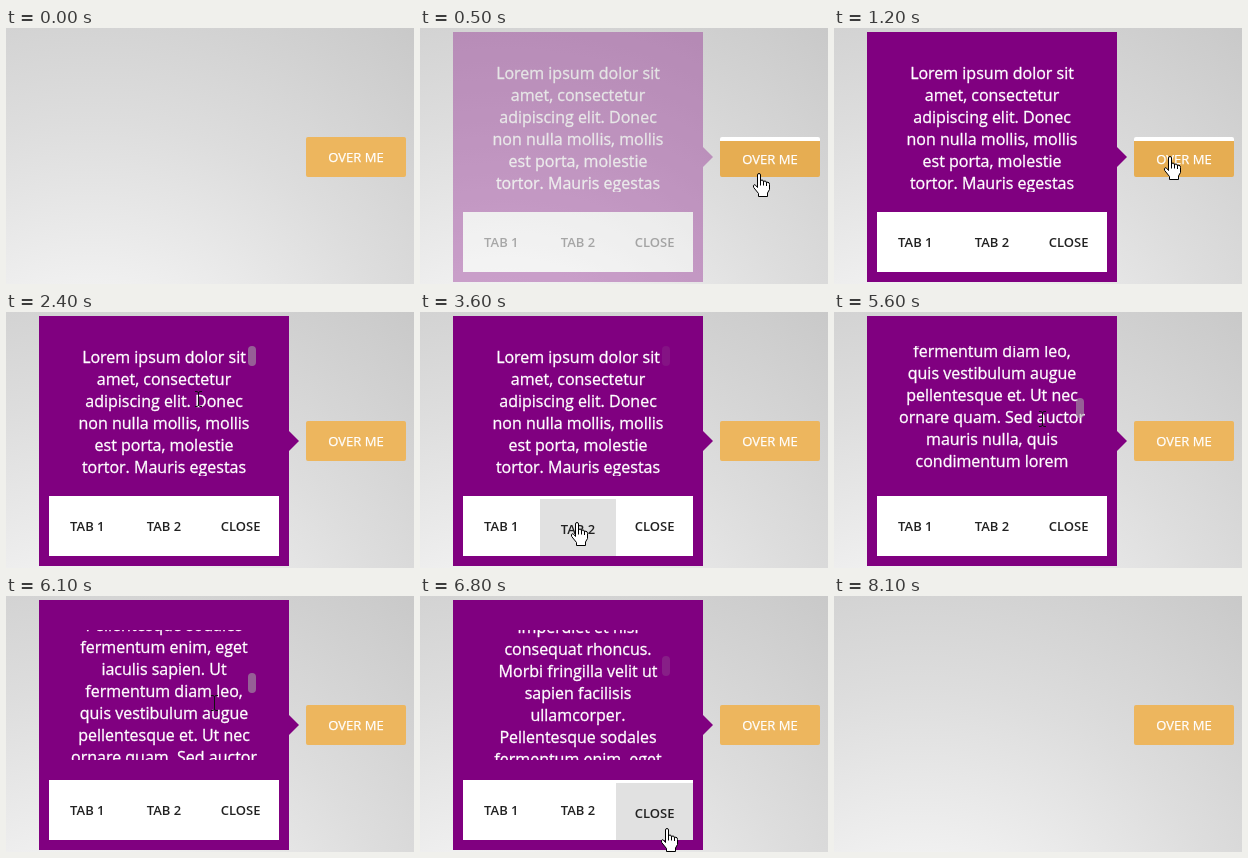
These frames come from a looping animation (408x256 px, 8700 ms). An HTML page:

```html
<!DOCTYPE html>
<html lang="en">
<head>
<meta charset="utf-8">
<title>Hover popup</title>
<style>
  html, body { margin: 0; width: 100%; height: 100%; overflow: hidden; }
  body {
    position: relative;
    font: 13px "Open Sans", sans-serif;
    background: radial-gradient(circle at 85px 421px, #f0f0f0 165px, #ddd 329px, #c8c8c8 540px);
  }
  div, svg { position: absolute; box-sizing: border-box; }
  #button {
    left: 300px; top: 109px; width: 100px; height: 40px;
    line-height: 40px; text-align: center; color: #fff;
    background: #edb65e; border-radius: 2px;
    -webkit-text-stroke: .25px #fff;
  }
  #button.hover { border-top: 4px solid #fff; line-height: 36px; background: #e6ad52; }
  #popup { left: 33px; top: 4px; width: 250px; height: 250px; background: #800080; }
  #popup::after {
    content: ""; position: absolute; left: 250px; top: 115px;
    border: 10px solid transparent; border-left-color: #800080; border-right: 0;
  }
  #view { left: 20px; top: 30px; width: 210px; height: 130px; overflow: hidden; }
  #text {
    left: 0; top: 0; width: 210px; white-space: pre; text-align: center;
    color: #fff; font-size: 16px; line-height: 22px;
    -webkit-text-stroke: .3px #fff;
  }
  #thumb {
    left: 209px; top: 30px; width: 8px; height: 20px;
    border-radius: 4px; background: rgba(167, 167, 167, .57);
  }
  #tabs { left: 10px; top: 180px; width: 230px; height: 60px; display: flex; background: #fff; }
  .tab {
    position: static; flex: 1; overflow: hidden; line-height: 60px;
    text-align: center; font-weight: 600; color: #222;
  }
  .tab.hover { border-top: 3px solid #fff; background: #e1e1e1; }
  svg { left: 0; top: 0; overflow: visible; }
</style>
</head>
<body>
<div id="button">OVER ME</div>
<div id="popup">
  <div id="view"><div id="text">Lorem ipsum dolor sit
amet, consectetur
adipiscing elit. Donec
non nulla mollis, mollis
est porta, molestie
tortor. Mauris egestas
tristique lacus, ut
imperdiet et nisi
consequat rhoncus.
Morbi fringilla velit ut
sapien facilisis
ullamcorper.
Pellentesque sodales
fermentum enim, eget
iaculis sapien. Ut
fermentum diam leo,
quis vestibulum augue
pellentesque et. Ut nec
ornare quam. Sed auctor
mauris nulla, quis
condimentum lorem
dapibus vitae. Nulla
facilisi. Aenean eget
tellus sit amet nisl
posuere porta. Integer
at libero non purus
tempus viverra.</div></div>
  <div id="thumb"></div>
  <div id="tabs">
    <div class="tab">TAB 1</div>
    <div class="tab">TAB 2</div>
    <div class="tab">CLOSE</div>
  </div>
</div>
<svg id="cursor" width="24" height="26">
  <path id="arrow" fill="#fff" stroke="#000" d="M.5.5V16.5L4.2 13 6.7 18.8 9 17.8 6.6 12.2H11.8Z"/>
  <g id="hand" fill="#fff" stroke="#000" stroke-linejoin="round" transform="translate(-1)">
    <path d="M-.5 14.5V2Q-.5.5 1 .5T2.5 2V8.5Q2.5 7 4 7T5.5 9Q5.5 8 7 8T8.5 10Q8.5 9 10 9.2T11.5 11.5V16.5L9.5 20V23.5H.5V20.5L-4.3 14.5Q-5.2 12.5-3.8 11.7-2.6 11.4-.5 14.5Z"/>
    <path fill="none" d="M2.5 8V12.5M5.5 9V12.5M8.5 10V13"/>
  </g>
  <path id="beam" fill="none" stroke="#111" d="M-3-7.5H-1L.5-6.5 2-7.5H4M.5-7V7M-3 7.5H-1L.5 6.5 2 7.5H4"/>
</svg>
<script>
const LOOP = 8700, STEP = 100, WHEEL = 56;
const $ = id => document.getElementById(id);
const tabs = [...document.querySelectorAll('.tab')];

const start = { x: 352, y: 238 };
const moves = [
  { from: 200, to: 600, x: 337, y: 128 },   // onto the button
  { from: 1170, to: 1700, x: 177, y: 103 }, // into the text
  { from: 2240, to: 2500, x: 199, y: 79 },
  { from: 2900, to: 3000, x: 203, y: 79 },
  { from: 3100, to: 3400, x: 214, y: 205 }, // along the tabs
  { from: 3400, to: 3800, x: 100, y: 215 },
  { from: 3800, to: 4400, x: 208, y: 107 }, // back to scroll
  { from: 6300, to: 6600, x: 185, y: 200 },
  { from: 6600, to: 6800, x: 247, y: 232 }, // close
  { from: 7300, to: 8000, x: 307, y: 252 }
];

const clamp = (v, lo, hi) => Math.min(hi, Math.max(lo, v));
const fade = (t, from, to) => clamp((t - from) / (to - from), 0, 1);
const ease = p => p * p * (3 - 2 * p);
const notches = (t, from, every, max) => clamp(Math.round((t - from) / every), 0, max);

function pointer(t) {
  let { x, y } = start;
  for (const m of moves) {
    const p = ease(fade(t, m.from, m.to));
    x += (m.x - x) * p;
    y += (m.y - y) * p;
  }
  return [Math.round(x), Math.round(y)];
}

function render(t) {
  const [x, y] = pointer(t);
  const inside = (l, top, r, b) => x >= l && x < r && y >= top && y < b;
  const shown = fade(t, 400, 700) - fade(t, 7300, 7800);
  const thumb = fade(t, 1400, 1700) - fade(t, 3200, 3700)
              + fade(t, 4100, 4400) - fade(t, 6400, 7000);
  const scroll = WHEEL * (notches(t, 4500, 140, 5) + notches(t, 5500, 100, 3)
               - notches(t, 5800, 100, 5));
  const present = t >= 300 && t < 8100;

  const onButton = present && inside(300, 109, 400, 149);
  const onTabs = shown > 0 && inside(43, 184, 273, 244);
  const onText = shown > 0 && inside(63, 34, 253, 164);
  const tab = onTabs ? Math.floor((x - 43) * 3 / 230) : -1;

  $('button').classList.toggle('hover', onButton);
  tabs.forEach((el, i) => el.classList.toggle('hover', i === tab));
  $('popup').style.opacity = shown;
  $('text').style.top = -scroll + 'px';
  $('thumb').style.top = 30 + Math.round(scroll * 110 / 715) + 'px';
  $('thumb').style.opacity = thumb;

  const kind = onButton || onTabs ? 'hand' : onText ? 'beam' : 'arrow';
  for (const id of ['arrow', 'hand', 'beam']) {
    $(id).style.display = present && id === kind ? '' : 'none';
  }
  $('cursor').style.transform = `translate(${x}px, ${y}px)`;
}

function tick() {
  const t = performance.now() % LOOP;
  render(Math.floor(t / STEP) * STEP);
  requestAnimationFrame(tick);
}
tick();
</script>
</body>
</html>
```
